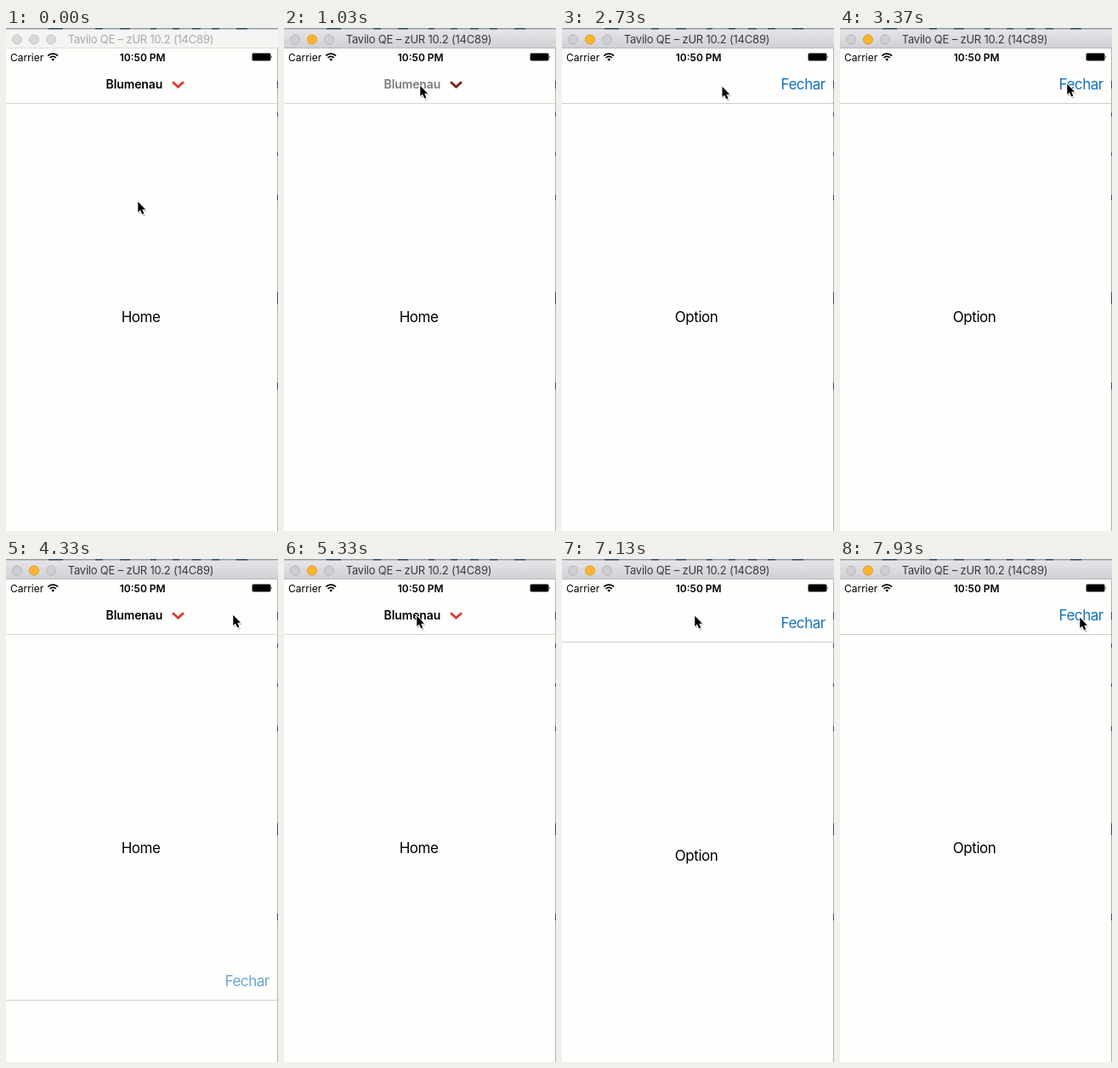
An HTML page that plays this animation: 320x590 px, repeating every 8000 ms.

```html
<!DOCTYPE html>
<html lang="en">
<head>
<meta charset="utf-8">
<title>Option sheet</title>
<style>
  html, body { margin: 0; width: 100%; height: 100%; overflow: hidden; background: #fefefd; }
  svg { display: block; width: 320px; height: 590px; font-family: Inter, Roboto, sans-serif; }
  .body { font-size: 17px; letter-spacing: -.45px; }
  .loop { animation: 8s infinite both; }
  .step { animation-timing-function: step-end; }

  /* critically damped spring */
  #sheet {
    animation-name: sheet;
    animation-timing-function: linear(0, .09 5.13%, .264 10.26%, .442 15.38%, .594 20.51%, .713 25.64%,
      .801 30.77%, .864 35.9%, .908 41.03%, .96 51.28%, .983 61.54%, .993 71.8%, .997 82.05%, 1);
  }
  @keyframes sheet {
    0%, 18.44% { transform: translateY(568px); }
    25.11%, 52.26% { transform: translateY(0); }
    58.94%, 84.95% { transform: translateY(568px); }
    91.63%, 100% { transform: translateY(0); }
  }

  #close { animation-name: close; animation-timing-function: linear; }
  @keyframes close {
    0%, 49.12% { opacity: 1; }
    49.125%, 52.125% { opacity: .3; }
    56.25%, 100% { opacity: 1; }
  }

  #active { animation-name: activate; }
  @keyframes activate {
    0% { opacity: 0; }
    10.875%, 100% { opacity: 1; }
  }

  #city { animation-name: city; }
  @keyframes city {
    0%, 18.375%, 83.375%, 100% { opacity: 1; }
    12.875%, 77.875% { opacity: .52; }
  }
  #chevron { animation-name: chevron; }
  @keyframes chevron {
    0%, 18.375%, 83.375%, 100% { stroke: #e03a2c; }
    12.875%, 77.875% { stroke: #7a1f18; }
  }

  #cursor { animation-name: cursor; animation-timing-function: ease-in-out; }
  @keyframes cursor {
    0%, .375% { transform: translate(155px, 203px); }
    10.375% { transform: translate(160px, 67px); }
    33% { transform: translate(160px, 67px); animation-timing-function: linear; }
    34.125% { transform: translate(188px, 68px); animation-timing-function: ease-out; }
    42.125%, 58.75% { transform: translate(267px, 65px); }
    66.625%, 93.375% { transform: translate(156px, 66px); }
    99.125%, 100% { transform: translate(282px, 68px); }
  }
</style>
</head>
<body>
<svg viewBox="0 0 320 590">
  <defs>
    <linearGradient id="bar" x2="0" y2="1">
      <stop stop-color="#e7e6e9"/>
      <stop offset="1" stop-color="#d0cfd4"/>
    </linearGradient>
  </defs>
  <rect width="320" height="590" fill="#fefefd"/>

  <!-- home screen -->
  <path d="M0 88.5H320" stroke="#d6d6d3"/>
  <text id="city" class="loop step" x="117.5" y="71" font-size="14" font-weight="600" letter-spacing="-.1">Blumenau</text>
  <path id="chevron" class="loop step" d="M196 63.2L202.5 69L209 63.2" fill="none" stroke-width="2.8"/>
  <text class="body" x="135.7" y="345">Home</text>

  <g id="sheet" class="loop">
    <rect y="24" width="320" height="568" fill="#fefefd"/>
    <path d="M0 88.5H320" stroke="#cdcdca"/>
    <text id="close" class="body loop" x="257.5" y="72" fill="#1472ba">Fechar</text>
    <text class="body" x="132.8" y="345">Option</text>
  </g>

  <!-- status bar -->
  <text x="5" y="38.5" font-size="12">Carrier</text>
  <path d="M49.3 32.6a8.2 8.2 0 0 1 11.8 0M51.6 35a5 5 0 0 1 7.2 0" fill="none" stroke="#000" stroke-width="1.7"/>
  <path d="M53.3 36.7a2.7 2.7 0 0 1 3.8 0L55.2 38.8Z"/>
  <text x="160.7" y="38.5" font-size="12" font-weight="600" text-anchor="middle">10:50 PM</text>
  <rect x="289.5" y="29.5" width="22" height="9" rx="1.8" fill="none" stroke="#000" stroke-opacity=".45"/>
  <rect x="290" y="30" width="21" height="8" rx="1"/>
  <path d="M312.4 32.3q1.4 1.7 0 3.4Z"/>

  <!-- window frame -->
  <rect width="320" height="24" fill="#f4f4f3"/>
  <path d="M0 23.5H320" stroke="#dfdfd2"/>
  <g fill="#d9d9d9" stroke="#c6c6c6">
    <circle cx="13" cy="13.5" r="5.5"/>
    <circle cx="33" cy="13.5" r="5.5"/>
    <circle cx="53" cy="13.5" r="5.5"/>
  </g>
  <text x="158.5" y="18" font-size="13" letter-spacing="-.2" text-anchor="middle" fill="#a9a9a9">Tavilo QE – zUR 10.2 (14C89)</text>
  <g id="active" class="loop step">
    <rect width="320" height="24" fill="url(#bar)"/>
    <path d="M0 23.5H320" stroke="#b8b7bc"/>
    <g fill="#cfced2" stroke="#b6b5ba">
      <circle cx="13" cy="13.5" r="5.5"/>
      <circle cx="33" cy="13.5" r="5.5" fill="#fcb52c" stroke="#dc9a28"/>
      <circle cx="53" cy="13.5" r="5.5"/>
    </g>
    <text x="158.5" y="18" font-size="13" letter-spacing="-.2" text-anchor="middle" fill="#3a3a3c">Tavilo QE – zUR 10.2 (14C89)</text>
  </g>
  <path d="M0 .75H320" stroke="#939ca0" stroke-width="1.5"/>
  <path d="M50 .75h17m38 0h9m20 0h12m24 0h7m19 0h8m15 0h10m13 0h9m20 0h13" stroke="#2f5568" stroke-width="1.5"/>
  <path d="M319.5 24V590" stroke="#b0b0b0"/>
  <path d="M319.5 62v9m0 28v5m0 42v4m0 46v6m0 108v14m0 92v8" stroke="#3d4a58"/>

  <g id="cursor" class="loop">
    <path d="M1 2V15.5L4 13L6.5 18L9 17L6.8 12H11Z" opacity=".22"/>
    <path d="M.3 .8V13L3 10.5L5.2 15.5L7.3 14.6L5.2 9.7H9Z" stroke="#fff" stroke-width="1.6" paint-order="stroke"/>
  </g>
</svg>
</body>
</html>
```
